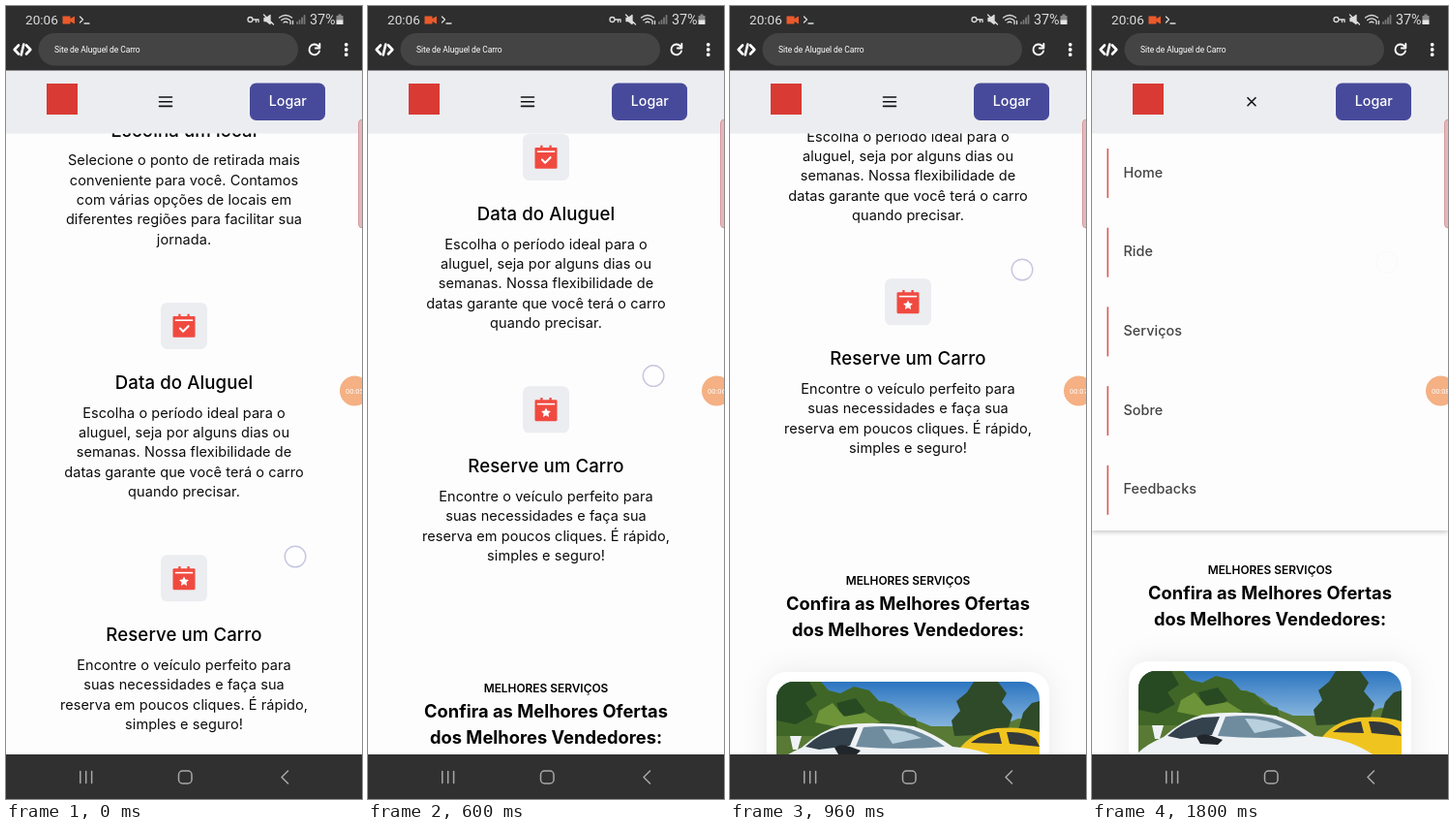
Recreate the animation shown at these times as an HTML page. Size 368 by 818 pixels, loop 1920 ms.

```html
<!DOCTYPE html>
<html lang="pt-BR">
<head>
<meta charset="utf-8">
<title>Aluguel de Carro</title>
<style>
  html, body { margin: 0; height: 100%; overflow: hidden; background: #fdfdfd; }
  svg { display: block; width: 100vw; height: 100vh; font-family: Inter, "Open Sans", sans-serif; }
  .mid { text-anchor: middle; }
  .title { font-size: 18.6px; font-weight: 500; letter-spacing: .1px; }
  .para { font-size: 14.5px; letter-spacing: .07px; fill: #0c0c0c; }
  .over { font-size: 11.9px; font-weight: 600; }
  .head { font-size: 18.3px; font-weight: 700; letter-spacing: .03px; }
  .link { font-size: 14.4px; font-weight: 500; letter-spacing: .05px; fill: #444; }
  .status { font: 13.6px Roboto, sans-serif; fill: #dcdcdc; }
  .line { fill: none; stroke-linecap: round; stroke-linejoin: round; }
  .card { filter: drop-shadow(0 0 14px rgba(0, 0, 0, .08)); }
  #panel { filter: drop-shadow(0 2px 2px rgba(0, 0, 0, .2)); }
</style>
</head>
<body>
<svg viewBox="0 0 368 818">
  <defs>
    <linearGradient id="sky" x2="0" y2="1">
      <stop stop-color="#2c75c0"/><stop offset=".35" stop-color="#a5cbe8"/>
    </linearGradient>
    <clipPath id="round"><rect width="272" height="180" rx="18"/></clipPath>
    <path id="calendar" fill="#f04a40" d="M9 1v2h6V1h2v2h4a1 1 0 0 1 1 1v17a1 1 0 0 1-1 1H3a1 1 0 0 1-1-1V4a1 1 0 0 1 1-1h4V1z"/>
  </defs>

  <rect width="368" height="818" fill="#fdfdfd"/>
  <g id="page">
    <g id="steps"></g>
    <g class="mid">
      <text class="over" x="184" y="881.5">MELHORES SERVIÇOS</text>
      <text class="head" x="184" y="907.5">Confira as Melhores Ofertas</text>
      <text class="head" x="184" y="934.5">dos Melhores Vendedores:</text>
    </g>
    <rect class="card" x="38" y="972" width="292" height="300" rx="20" fill="#fff"/>
    <g transform="translate(48 982)" clip-path="url(#round)">
      <rect width="272" height="180" fill="url(#sky)"/>
      <path fill="#587a35" d="M0 36L40 28 80 20 112 20 128 28 140 38 160 46 190 46 225 48 250 38 272 40V90H0z"/>
      <path fill="#3f6627" d="M0 0H46L54 9 66 12 80 5 96 9 106 20 120 23 130 34 144 38 148 56H0z"/>
      <path fill="#284a22" d="M0 0H34L42 14 30 22 38 34 20 44 0 40zM62 22L82 17 92 30 80 38 66 34z"/>
      <path fill="#6d9438" d="M44 30L58 22 70 36 92 32 108 42 60 46 40 42z"/>
      <path fill="#2f4a29" d="M184 56L181 40 190 30 186 20 197 11 204 0H229L238 12 233 21 244 34 238 54zM250 50L255 32 264 22 272 20V54z"/>
      <path fill="#f0c41f" d="M190 68Q204 51 228 48Q254 46 272 52V100H190z"/>
      <path fill="#34393a" d="M201 63Q211 54 230 52L233 64zM238 52Q258 51 268 59L272 67 241 64z"/>
      <path fill="#eef2f5" d="M0 84Q8 76 26 68Q46 50 66 45Q104 40 142 46Q164 54 182 67Q224 70 250 92V180H0zM14 56H26L22 70H17z"/>
      <path fill="#33424d" d="M30 67Q46 52 66 48L84 47 76 66 44 70z"/>
      <path fill="#6f8c9f" d="M90 47Q124 44 142 50Q160 56 174 67Q130 71 82 67z"/>
      <path fill="#b9d0df" d="M110 49Q132 49 150 58L120 64z"/>
      <path fill="#20262b" d="M60 68Q66 63 76 67L87 71 82 76 64 75z"/>
    </g>
  </g>

  <g id="menu">
    <rect id="panel" y="100" width="368" height="441" fill="#fdfdfd"/>
  </g>

  <rect y="66" width="368" height="65.5" fill="#ecedf1"/>
  <rect x="42" y="80" width="32" height="32" fill="#d93a34"/>
  <g class="line" stroke="#111" stroke-width="1.6">
    <path id="burger" d="M158.5 94h13M158.5 98.7h13M158.5 103.4h13"/>
    <path id="cross" d="M161 94.7l8 8m0-8l-8 8"/>
  </g>
  <rect x="252" y="79.5" width="78" height="38.5" rx="6.5" fill="#474a9a"/>
  <text class="mid" x="291.3" y="103.3" font-size="14.2" font-weight="500" fill="#fff">Logar</text>

  <rect width="368" height="66.5" fill="#2e2e2e"/>
  <rect x="33.5" y="28" width="268.5" height="33.5" rx="16.7" fill="#444"/>
  <text x="50" y="48" font-family="Roboto, sans-serif" font-size="8.5" letter-spacing="-.08" fill="#fff">Site de Aluguel de Carro</text>
  <g class="line" stroke="#fff" stroke-width="2.6">
    <path d="M13 40.500l-4.300 4.500 4.300 4.500M21 40.500l4.300 4.500-4.300 4.500M18.300 39.500l-2.600 11"/>
    <path stroke-width="1.9" d="M323 41.500a5.400 5.400 0 1 0 1 5M324.300 39v4.500h-4.500"/>
    <path stroke-width="3.8" d="M351.700 39.800h0M351.700 45h0M351.700 50.200h0"/>
  </g>
  <text class="status" x="20" y="18.500">20:06</text>
  <path fill="#ea5a2b" d="M58.500 10.500h8v2.500l4.500-2.500v8l-4.500-2.500v2.500h-8z"/>
  <g class="line" stroke="#dcdcdc" stroke-width="1.300">
    <path d="M76.500 11l3 3-3 3M81 18h5"/>
    <path d="M250 14a2.500 2.500 0 1 0 5 0a2.500 2.500 0 1 0-5 0M255 14h6v2.500M258.500 14v2.500"/>
    <path d="M267 12.500h2l4-3v9l-4-3h-2zM266.500 9l10 10" fill="#dcdcdc"/>
    <path d="M282.500 12q6.500-5 13 0M284.700 14.500q4.300-3.300 8.600 0M287 17q2-1.500 4 0M294 15.500v3m2.500 0v-3"/>
    <path stroke="#777" stroke-width="1.800" d="M301 18v-1M303.500 18v-3M306 18v-5.500M308.500 18v-8"/>
  </g>
  <text class="status" x="314" y="18.500" style="font-size: 14.3px">37%</text>
  <path fill="#888" d="M341.500 10h2v-1.500h3V10h2v5h-7z"/>
  <path fill="#e4e4e4" d="M341.500 14.500h7V19h-7z"/>

  <rect y="772" width="368" height="46" fill="#303030"/>
  <g class="line" stroke="#a8a8a8" stroke-width="1.500">
    <path d="M76.800 789.500v12M82.700 789.500v12M88.600 789.500v12M291.500 789l-6.500 6.500 6.500 6.500"/>
    <rect x="178.500" y="789" width="13.500" height="13" rx="4"/>
  </g>

  <rect x="364.500" y="117" width="12" height="112" rx="4" fill="#e2b9bd" stroke="#d5989d"/>
  <circle cx="360.500" cy="397" r="15.500" fill="#f5b083"/>
  <text id="clock" x="351" y="399.700" font-family="Roboto, sans-serif" font-size="7.500" fill="#fff"></text>
  <circle id="touch" r="10.800" fill="#fff" fill-opacity=".6" stroke="#c6c6e0" stroke-width="1.400"/>
</svg>

<script>
const LOOP = 1920, STEP = 120, KEY = 240;
const el = id => document.getElementById(id);
const text = (cls, x, y, str) => `<text class="${cls}" x="${x}" y="${y}">${str}</text>`;

const marks = {
  check: '<path class="line" stroke="#fff" stroke-width="1.8" d="M8.500 14l2.700 2.700 4.800-4.800"/>',
  star: '<path fill="#fff" d="M12 10l1.300 2.800 3 .4-2.200 2.100.6 3-2.700-1.500-2.700 1.500.6-3-2.200-2.100 3-.4z"/>',
};

function step(i, title, mark, lines) {
  const y = 134.5 + i * 260.4;
  return `<g transform="translate(160 ${y - 89})"><rect width="48" height="48" rx="6.500" fill="#ecedf1"/>
    <g transform="translate(10.200 10.600) scale(1.150)"><use href="#calendar"/>
    <path stroke="#fff" stroke-width="1.400" d="M4 6.700h16"/>${marks[mark]}</g></g>`
    + text('mid title', 184, y, title)
    + lines.map((line, n) => text('mid para', 184, y + 29.7 + n * 20.4, line)).join('');
}

el('steps').innerHTML =
  step(0, 'Escolha um local', 'check', ['Selecione o ponto de retirada mais', 'conveniente para você. Contamos',
    'com várias opções de locais em', 'diferentes regiões para facilitar sua', 'jornada.']) +
  step(1, 'Data do Aluguel', 'check', ['Escolha o período ideal para o', 'aluguel, seja por alguns dias ou',
    'semanas. Nossa flexibilidade de', 'datas garante que você terá o carro', 'quando precisar.']) +
  step(2, 'Reserve um Carro', 'star', ['Encontre o veículo perfeito para', 'suas necessidades e faça sua',
    'reserva em poucos cliques. É rápido,', 'simples e seguro!']);

el('menu').innerHTML += ['Home', 'Ride', 'Serviços', 'Sobre', 'Feedbacks'].map((name, i) => {
  const y = 147 + i * 81.7;
  return `<rect x="15.500" y="${y}" width="1.600" height="51" fill="#dc5b55"/>` + text('link', 32.5, y + 29.5, name);
}).join('');

// Smooth curve through values spaced KEY ms apart, flat past the end
function curve(values, t) {
  const i = Math.floor(t / KEY), f = t / KEY - i;
  const [a, b, c, d] = [-1, 0, 1, 2].map(k => values[Math.max(0, Math.min(values.length - 1, i + k))]);
  return b + f / 2 * (c - a + f * (2 * a - 5 * b + 4 * c - d + f * (3 * (b - c) + d - a)));
}

const scroll = [0, 45, 118, 228, 285, 296];
const touchX = [299, 296, 298, 293, 302, 305];
const touchY = [568, 513, 438, 327.5, 272, 264.5];
const touchAlpha = [1, 1, 1, 1, 1, .28, .1, .05];

function draw(now) {
  const t = Math.floor(now % LOOP / STEP) * STEP;
  const p = Math.max(0, Math.min(1, (t - 1380) / 360));
  const open = p * p * (3 - 2 * p);

  el('page').setAttribute('transform', `translate(0 ${-curve(scroll, t)})`);
  el('menu').setAttribute('transform', `translate(0 ${(open - 1) * 480})`);
  el('burger').style.opacity = p ? 0 : 1;
  el('cross').style.opacity = p ? 1 : 0;
  el('clock').textContent = '00:0' + (5 + Math.floor((t + 640) / 800));

  const touch = el('touch');
  touch.setAttribute('cx', curve(touchX, t));
  touch.setAttribute('cy', curve(touchY, t));
  touch.style.opacity = curve(touchAlpha, t);
  requestAnimationFrame(draw);
}
draw(performance.now());
</script>
</body>
</html>
```
